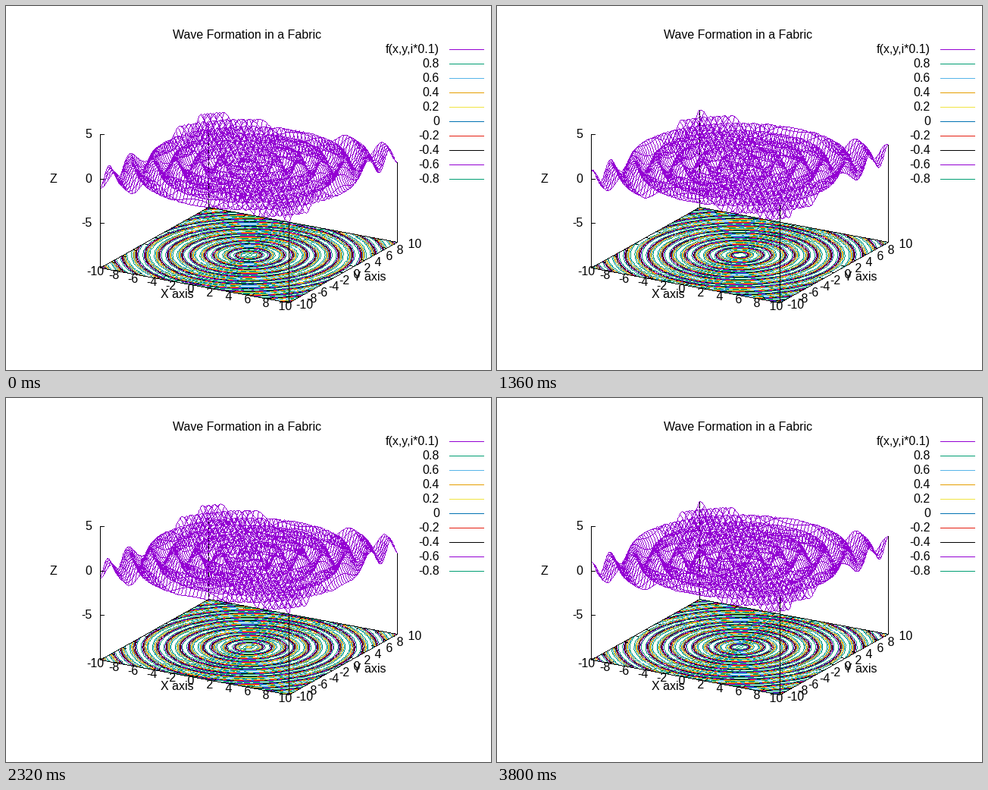
Recreate the animation shown at these times as a matplotlib script. Size 640 px wide and 480 px high, loop 3840 ms.

```python
import numpy as np
import matplotlib.pyplot as plt
from matplotlib.animation import FuncAnimation
from matplotlib.colors import to_rgb

W, H, DPI = 640, 480, 100
FRAMES, INTERVAL = 96, 40
FONT = dict(family="Liberation Sans", size=16 * 72 / DPI, color="black")

PURPLE, GREEN, SKY, ORANGE = "#9400d3", "#009e73", "#56b4e9", "#e69f00"
YELLOW, BLUE, RED, BLACK = "#f0e442", "#0072b2", "#e51e10", "#000000"
RING_COLORS = [GREEN, SKY, ORANGE, YELLOW, BLUE, RED, BLACK, PURPLE, GREEN]
LEVELS = np.arange(-4, 5) * 0.2
R, BASE = 10, -10
ISO, SAMPLES = 50, 100
COS, SIN = np.cos(np.pi / 6), np.sin(np.pi / 6)


def wave(x, y, t):
    return np.sin(3 * np.hypot(x, y) + t)


def project(x, y, z):
    """Screen points, with (column, row) on the last axis."""
    px = 320 + 14.35 * (x * COS + y * SIN)
    py = 328 + 4.61 * (x * SIN - y * COS) - 11.7 * (z - BASE)
    return np.stack(np.broadcast_arrays(px, py), axis=-1)


def stroke(img, pts, color):
    """Draw hard one-pixel polylines; pts is (..., points, 2)."""
    pts = np.rint(np.asarray(pts, float))
    start = pts[..., :-1, :].reshape(-1, 2)
    step = pts[..., 1:, :].reshape(-1, 2) - start
    n = np.abs(step).max(axis=1).astype(int)
    seg = np.repeat(np.arange(len(n)), n + 1)
    k = np.arange(len(seg)) - np.repeat(np.cumsum(n + 1) - n - 1, n + 1)
    frac = k / np.maximum(n[seg], 1)
    cols, rows = np.rint(start[seg] + step[seg] * frac[:, None]).astype(int).T
    img[rows, cols] = to_rgb(color)


def tick(img, x, y, dx, dy, size=5):
    """Short mark at a base point, along the projected direction (dx, dy)."""
    p = project(x, y, BASE)
    d = project(x + dx, y + dy, BASE) - p
    stroke(img, [p, p + size * d / np.hypot(*d)], BLACK)


def draw_box(img):
    corners = np.array([(-R, -R), (R, -R), (R, R), (-R, R), (-R, -R)])
    stroke(img, project(corners[:, 0], corners[:, 1], BASE), BLACK)
    for v in range(-R, R + 1, 2):
        tick(img, v, -R, 0, 1)
        tick(img, v, R, 0, -1)
        tick(img, R, v, -1, 0)
        tick(img, -R, v, 1, 0)
    stroke(img, project(-R, -R, np.array([BASE, 5])), BLACK)
    for v in (5, 0, -5):
        p = project(-R, -R, v)
        stroke(img, [p, p + (5, 0)], BLACK)


def draw_post(img, x, y, t):
    """Vertical line from a base corner up to the surface."""
    stroke(img, project(x, y, np.array([BASE, wave(x, y, t)])), BLACK)


def text(x, mid, s, ha="center"):
    ax.text(x, mid + 4.5, s, ha=ha, va="baseline", **FONT)


def draw_labels():
    for v in range(-R, R + 1, 2):
        label = f"{v: d}"
        x, y = project(v, -R, BASE)
        text(x - 7, y + 5.5, label)
        x, y = project(R, v, BASE)
        text(x + 9, y + 3, label, "left")
    for v in (5, 0, -5):
        text(113, round(project(-R, -R, v)[1]), str(v), "right")
    text(317.5, 38, "Wave Formation in a Fabric")
    text(225.5, 380, "X axis")
    text(479.5, 357, "Y axis")
    text(62, 228, "Z")


def draw_key(img):
    names = ["f(x,y,i*0.1)"] + [f"{v / 10:g}" for v in range(8, -9, -2)]
    for k, (name, color) in enumerate(zip(names, [PURPLE] + RING_COLORS)):
        y = 57 + 19 * k
        text(571.5, y, name, "right")
        stroke(img, [(585, y), (630, y)], color)


fig = plt.figure(figsize=(W / DPI, H / DPI), dpi=DPI, facecolor="white")
ax = fig.add_axes([0, 0, 1, 1])
ax.axis("off")
backdrop = np.ones((H, W, 3))
picture = ax.imshow(backdrop, aspect="auto", interpolation="nearest")
ax.set_xlim(-0.5, W - 0.5)
ax.set_ylim(H - 0.5, -0.5)
draw_labels()
draw_key(backdrop)

gx, gy = np.meshgrid(np.linspace(-R, R, SAMPLES), np.linspace(-R, R, ISO))
floor = project(gx, gy, BASE)


def ring_paths(heights):
    # Negated heights put the highest level first.
    rings = ax.contour(floor[..., 0], floor[..., 1], -heights, levels=LEVELS)
    paths = rings.allsegs
    rings.remove()
    return paths


def update(i):
    t = 0.1 * i
    img = backdrop.copy()
    heights = wave(gx, gy, t)
    draw_post(img, -R, R, t)
    stroke(img, project(gx, gy, heights), PURPLE)
    stroke(img, project(gy, gx, heights), PURPLE)
    for paths, color in zip(ring_paths(heights), RING_COLORS):
        for path in paths:
            stroke(img, path, color)
    draw_box(img)
    draw_post(img, R, -R, t)
    draw_post(img, R, R, t)
    picture.set_data(img)
    return []


anim = FuncAnimation(fig, update, frames=FRAMES, interval=INTERVAL,
                     init_func=lambda: update(0), repeat=True,
                     repeat_delay=0, blit=False)
plt.show()
```
